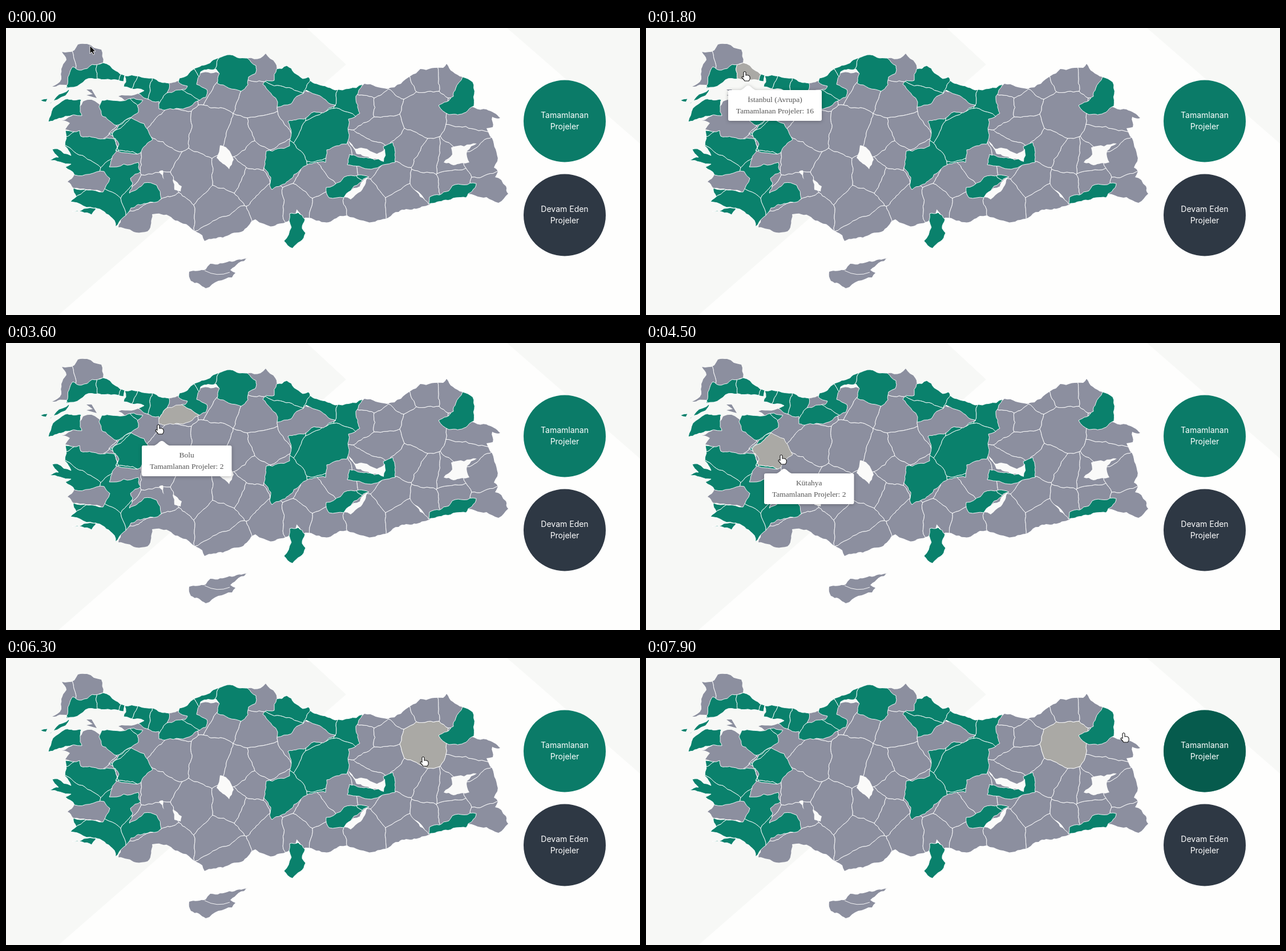
An HTML page for the animation above (8000 ms loop, 1111x504 px).

```html
<!DOCTYPE html>
<html lang="tr">
<head>
<meta charset="utf-8">
<title>Proje haritası</title>
<style>
html, body { margin: 0; width: 100%; height: 100%; overflow: hidden; background: #fefefd; }
svg { display: block; width: 1111px; height: 504px; }
.tint { fill: #f7f8f6; }
.land { fill: #8c8f9f; }
.done { fill: #0a816c; }
.cell, .border { stroke: #fff; stroke-width: .9; stroke-linejoin: round; }
.cell.on { fill: #aaa9a5; }
.border { fill: none; }
.lake { fill: #fafaf9; }
text { text-anchor: middle; }
.button text { font: 14px Inter, "Open Sans", sans-serif; fill: #fff; }
#tip text { font: 13.5px "Liberation Serif", "Noto Serif", serif; fill: #555; }
#tip { filter: drop-shadow(0 1px 3px rgba(0, 0, 0, .28)); }
#tip path, #tip rect { fill: #fff; }
</style>
</head>
<body>
<svg viewBox="0 0 1111 504">
  <defs>
    <clipPath id="land">
      <polygon points="98,42 120,39 126,29 142,28 167,38 170,61 140,76 115,80 108,100 81,103 97,90 97,72 106,56"/>
      <polygon points="135,129 150,126 170,140 208,127 197,120 242,113 262,118 286,97 340,80 415,75 424,53 446,53 455,45 472,62 480,95 510,110 520,300 497,337 468,348 437,336 412,358 380,368 348,374 344,364 305,341 272,327 256,327 248,357 228,359 197,350 208,315 165,286 118,281 108,270 120,257 160,250 125,190 104,178 112,167 98,163 120,150"/>
      <polygon points="490,105 560,115 605,115 628,98 668,107 692,98 726,72 766,70 772,63 783,77 800,86 800,138 842,143 866,158 852,156 853,174 842,176 858,213 861,234 855,245 862,252 857,262 868,267 880,291 863,307 842,297 822,294 770,290 742,310 688,323 670,333 632,340 585,330 558,341 520,335 500,300"/>
    </clipPath>
    <clipPath id="done">
      <polygon points="170,61 192,75 208,83 206,94 162,89 139,91 119,104 106,106 108,98 117,68 132,74 151,64"/>
      <polygon points="208,84 257,88 286,97 282,114 314,108 318,102 302,95 304,88 336,69 363,56 388,47 423,53 438,66 437,80 425,86 424,100 412,111 370,97 374,80 368,72 341,77 334,99 352,108 350,122 326,136 282,143 268,142 268,129 246,124 232,115 242,110 218,106 206,103 210,95"/>
      <polygon points="474,72 492,66 520,89 530,86 540,97 577,109 625,99 613,120 620,150 612,156 600,160 597,204 562,214 560,236 528,240 482,276 466,284 462,276 464,262 452,246 456,216 497,207 500,184 494,164 522,160 540,147 556,149 578,136 550,119 526,109 514,118 500,133 475,139 476,130 456,106 450,99 456,92 470,92"/>
      <polygon points="104,180 129,180 131,190 192,194 196,208 181,244 232,236 236,252 218,264 222,272 216,290 242,272 264,276 272,300 219,316 192,349 190,338 160,317 112,305 123,296 118,281 170,288 182,264 172,252 120,258 104,244 114,239 76,232 92,227 81,213 90,212 114,224 103,207"/>
      <polygon points="163,138 168,127 204,128 224,123 240,127 230,136 232,148 204,168 190,170 168,154"/>
      <polygon points="181,186 204,166 218,157 242,168 257,196 236,219 192,215 198,204"/>
      <polygon points="74,165 82,141 104,125 132,126 133,154 104,155"/>
      <polygon points="75,134 88,121 111,107 104,119"/>
      <polygon points="60,127 73,124 70,130"/>
      <polygon points="116,322 158,316 150,328"/>
      <polygon points="497,326 512,324 524,336 519,352 525,360 502,387 487,374 500,350"/>
      <polygon points="561,280 586,270 592,262 618,258 636,262 604,286 592,298 566,298"/>
      <polygon points="598,240 602,222 660,232 661,208 678,201 682,236 640,248"/>
      <polygon points="800,86 818,95 820,137 806,148 776,152 758,136 784,120 788,106"/>
      <polygon points="741,309 742,297 776,286 782,277 824,273 806,298 770,302"/>
    </clipPath>
  </defs>

  <path class="tint" d="M0 0H527L596 64 92 504H0zM878 0H1111V203z"/>

  <g class="land" id="landCells" clip-path="url(#land)"></g>
  <g class="done" id="doneCells" clip-path="url(#done)"></g>
  <g class="border" id="outlines"></g>
  <g class="land">
    <polygon class="rough" points="321,428 350,424 358,414 425,403 393,425 402,430 396,438 372,444 350,457 324,444"/>
    <path d="M141 108H150L159 123 141 118 152 116z"/>
  </g>
  <path class="border" d="M348 426Q370 438 392 429"/>
  <g class="lake">
    <polygon class="rough" points="375,206 388,212 399,231 391,248 369,228"/>
    <polygon class="rough" points="292,266 308,278 306,287 295,284"/>
    <polygon class="rough" points="268,252 275,250 277,266"/>
    <polygon class="rough" points="825,203 808,216 812,236 784,241 767,236 782,222 780,210"/>
    <polygon class="rough" points="600,198 612,212 626,211 650,221 664,212 662,235 642,230 614,221"/>
    <polygon class="rough" points="638,257 622,287 604,301 592,297 600,288 620,278"/>
  </g>

  <g class="button">
    <circle cx="979" cy="163.5" r="72" fill="#0b7b68"/>
    <circle id="shade" cx="979" cy="163.5" r="72" fill="#034b3f" opacity="0"/>
    <text x="979" y="158">Tamamlanan</text>
    <text x="979" y="178">Projeler</text>
    <circle cx="979" cy="328.5" r="72" fill="#2e3844"/>
    <text x="979" y="323">Devam Eden</text>
    <text x="979" y="343">Projeler</text>
  </g>

  <g id="tip">
    <path d="M18 1C27 0 30-8 35-8S43 0 52 1z"/>
    <rect id="box" height="54" rx="3"/>
    <text id="place" y="21"></text>
    <text id="count" y="41"></text>
  </g>

  <path id="arrow" d="M0 0V14L3 11 6 16 8 15 6 10H10z" fill="#111" stroke="#fff" stroke-width=".9"/>
  <path id="hand" d="M-2 9V1Q0-2 2 1V6Q8 5 9 9T7 16H0Q-2 13-5 10-5 7-2 9z" fill="#fff" stroke="#111" stroke-width="1.1"/>
</svg>
<script>
const LOOP = 8000, STEP = 100, W = 1111, H = 504;
const byId = id => document.getElementById(id);
const clamp = v => Math.max(0, Math.min(1, v));

// centres of the regions; each region is the area nearest to its centre
const plain = {
  kirklareli: [142, 54], eskisehir: [285, 175], ankara: [360, 180],
  corum: [438, 122], erzincan: [660, 175], erzurum: [728, 152]
};
const west = [
  [98, 62], [135, 160], [145, 268], [208, 230], [244, 140], [298, 104], [354, 88], [382, 104],
  [450, 68], [262, 226], [325, 262], [268, 285], [280, 315], [378, 312], [395, 345], [424, 272],
  [398, 260], [432, 220], [414, 196], [452, 184], [462, 312], [485, 240]
];
const east = [
  [520, 142], [510, 310], [540, 270], [560, 318], [625, 305], [580, 238], [682, 262], [705, 300],
  [735, 270], [775, 265], [770, 240], [835, 225], [850, 285], [742, 238], [700, 214], [636, 222],
  [634, 134], [640, 108], [656, 134], [690, 84], [726, 72], [790, 70], [812, 190], [816, 160]
];
const finished = {
  tekirdag: [140, 82], avrupa: [186, 80], asya: [218, 92], kocaeli: [238, 102], sakarya: [266, 106],
  bolu: [296, 128], kutahya: [226, 178], sivas: [580, 172], kars: [795, 122]
};
const finishedOthers = [
  [318, 86], [348, 66], [384, 80], [496, 88], [486, 122], [556, 116], [600, 124], [450, 264],
  [150, 206], [124, 248], [204, 262], [168, 316], [238, 292], [202, 148], [105, 142],
  [505, 355], [595, 280], [640, 238], [785, 288]
];

const projects = {
  tekirdag: ["Tekirdağ", 3], avrupa: ["İstanbul (Avrupa)", 16], asya: ["İstanbul (Asya)", 12],
  kocaeli: ["Kocaeli", 19], sakarya: ["Sakarya", 4], bolu: ["Bolu", 2],
  kutahya: ["Kütahya", 2], sivas: ["Sivas", 1], kars: ["Kars", 1]
};

// pointer moves: start, end, x, y
const moves = [
  [200, 500, 145, 42], [600, 900, 138, 50], [1000, 1300, 151, 78], [1400, 1800, 173, 77],
  [1800, 2100, 180, 79], [2300, 2900, 254, 94], [2900, 3200, 261, 107], [3200, 3800, 270, 163],
  [3900, 4500, 237, 197], [4600, 5200, 434, 125], [5400, 5700, 516, 160], [5700, 6000, 640, 178],
  [6100, 6800, 960, 165], [6800, 7000, 1042, 165], [7200, 7400, 941, 160], [7600, 7900, 837, 132]
];

// time at which each region comes under the pointer
const hovers = [
  [0, ""], [300, "kirklareli"], [1200, "tekirdag"], [1600, "avrupa"], [2500, "asya"],
  [2700, "kocaeli"], [3000, "sakarya"], [3500, "bolu"], [3700, "eskisehir"],
  [4300, "kutahya"], [4700, "eskisehir"], [4900, "ankara"], [5100, "corum"],
  [5600, "sivas"], [5900, "erzincan"], [6300, "erzurum"], [6500, "kars"],
  [6600, ""], [7900, "erzurum"]
];

// a ragged line from a to b, the same in both directions
function ragged(a, b) {
  if (a[0] > b[0] || (a[0] === b[0] && a[1] > b[1])) return ragged(b, a).reverse();
  const dx = b[0] - a[0], dy = b[1] - a[1], len = Math.hypot(dx, dy);
  if (len < 7) return [a, b];
  const noise = Math.sin(a[0] * 12.9 + a[1] * 78.2 + b[0] * 37.7 + b[1] * 11.3) * 43758;
  const shift = (noise - Math.floor(noise) - .5) * Math.min(len * .25, 5) / len;
  const mid = [(a[0] + b[0]) / 2 - dy * shift, (a[1] + b[1]) / 2 + dx * shift];
  return [...ragged(a, mid), ...ragged(mid, b).slice(1)];
}

function roughen(points) {
  return points.flatMap((p, i) => ragged(p, points[(i + 1) % points.length]).slice(0, -1));
}

function toText(points) {
  return points.map(p => p.map(v => v.toFixed(1)).join()).join(" ");
}

// the part of a polygon that lies nearer to a than to b
function nearer(poly, a, b) {
  const side = p => (p[0] - (a[0] + b[0]) / 2) * (b[0] - a[0]) + (p[1] - (a[1] + b[1]) / 2) * (b[1] - a[1]);
  return poly.flatMap((p, i) => {
    const q = poly[(i + 1) % poly.length], s = side(p), e = side(q);
    const out = s <= 0 ? [p] : [];
    if (s * e < 0) out.push(p.map((v, n) => v + (q[n] - v) * s / (s - e)));
    return out;
  });
}

function addCells(group, named, others) {
  const sites = [...Object.entries(named), ...others.map(p => ["", p])];
  for (const [id, site] of sites) {
    let poly = [[0, 0], [W, 0], [W, H], [0, H]];
    for (const [, other] of sites) if (other !== site) poly = nearer(poly, site, other);
    const cell = document.createElementNS("http://www.w3.org/2000/svg", "polygon");
    if (id) cell.id = id;
    cell.setAttribute("class", "cell");
    cell.setAttribute("points", toText(roughen(poly.map(p => p.map(Math.round)))));
    group.append(cell);
  }
}

for (const el of document.querySelectorAll("clipPath polygon, .rough")) {
  const points = el.getAttribute("points").split(" ").map(p => p.split(",").map(Number));
  el.setAttribute("points", toText(roughen(points)));
}
for (const el of byId("done").children) byId("outlines").append(el.cloneNode());
addCells(byId("landCells"), plain, [...west, ...east]);
addCells(byId("doneCells"), finished, finishedOthers);

function pointer(t) {
  let x = 147, y = 31;
  for (const [from, to, toX, toY] of moves) {
    const k = clamp((t - from) / (to - from));
    x += (toX - x) * k;
    y += (toY - y) * k;
  }
  return [x, y];
}

function move(el, x, y) {
  el.setAttribute("transform", `translate(${Math.round(x)} ${Math.round(y)})`);
}

function show(el, visible) {
  el.style.display = visible ? "" : "none";
}

const tip = byId("tip"), box = byId("box"), place = byId("place"), count = byId("count");
const arrow = byId("arrow"), hand = byId("hand"), shade = byId("shade");
let active = null;

function drawTip(id, t) {
  const info = projects[id];
  show(tip, info);
  if (!info) return;
  const width = info[1] > 9 ? 164 : 157.5;
  box.setAttribute("width", width);
  place.setAttribute("x", width / 2);
  count.setAttribute("x", width / 2);
  place.textContent = info[0];
  count.textContent = "Tamamlanan Projeler: " + info[1];
  // the card runs slightly ahead of the drawn pointer
  const [x, y] = pointer(t + 35);
  move(tip, x - 30, y + 32);
}

function draw(t) {
  const id = hovers.filter(h => h[0] <= t).pop()[1];
  if (active) active.classList.remove("on");
  active = id ? byId(id) : null;
  if (active) active.classList.add("on");
  drawTip(id, t);

  const [x, y] = pointer(t);
  move(arrow, x, y);
  move(hand, x, y);
  show(arrow, t < 300);
  show(hand, t >= 300);
  shade.setAttribute("opacity", Math.min(clamp((t - 6690) / 120), clamp(1 - (t - 7800) / 300)));
}

const start = performance.now();
function tick() {
  const t = (performance.now() - start) % LOOP;
  draw(Math.floor(t / STEP) * STEP);
  requestAnimationFrame(tick);
}
tick();
</script>
</body>
</html>
```
